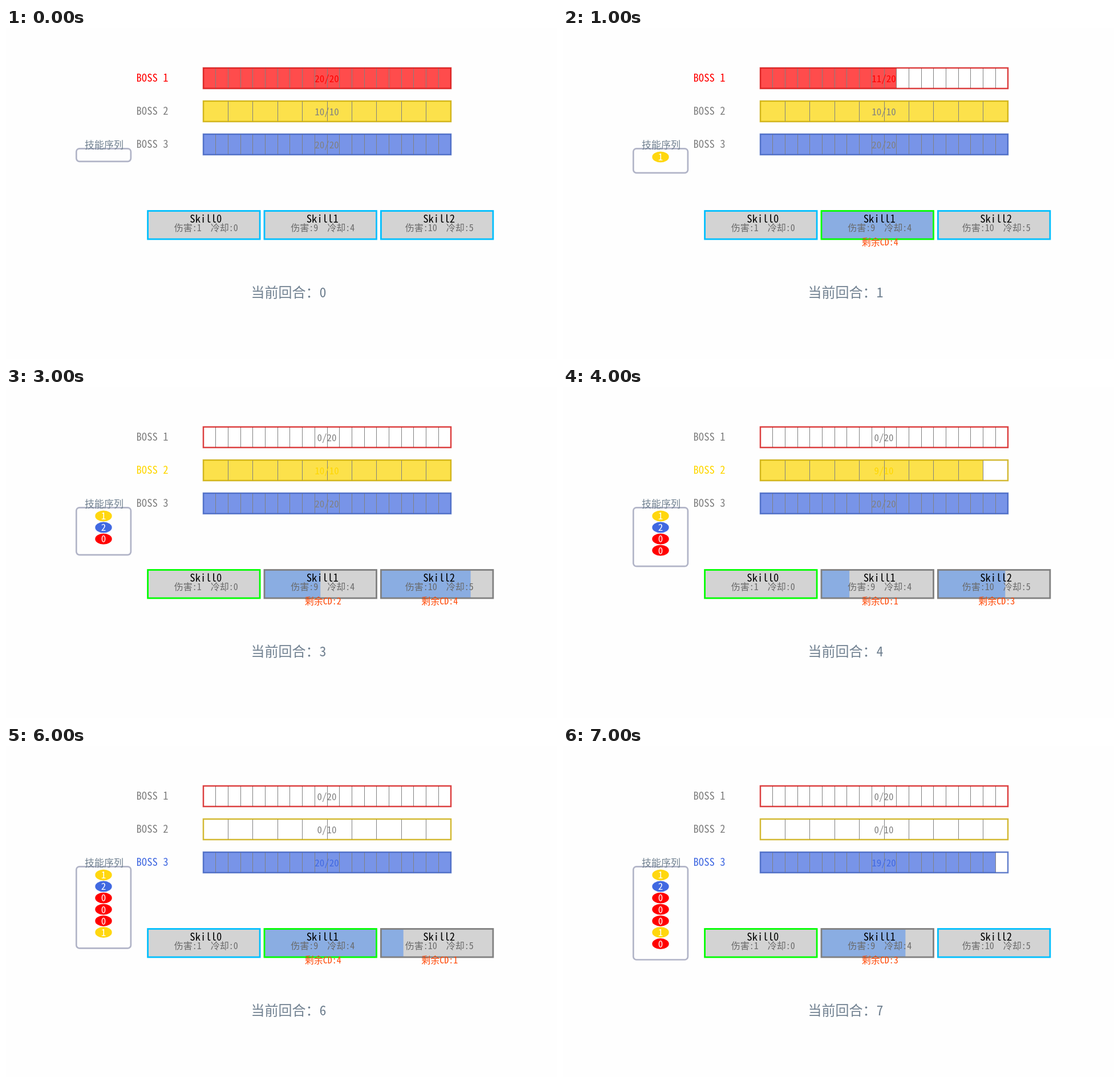
Animation, 966 px wide and 580 px high, one loop 8000 ms. Source, as an HTML page:

```html
<!DOCTYPE html>
<html lang="zh-CN">
<head>
<meta charset="utf-8">
<title>技能序列</title>
<style>
html, body { margin: 0; width: 100%; height: 100%; overflow: hidden; background: #fefefe; }
svg { display: block; }
text { font-family: "Noto Sans Mono CJK SC", "Noto Sans CJK SC", "Noto Sans CJK", "Noto Sans Mono", monospace; white-space: pre; }
</style>
</head>
<body>
<svg id="stage" width="966" height="580" viewBox="0 0 966 580"></svg>
<script>
const TURN_MS = 1000;
const TURNS = 8;
const CASTS = [1, 2, 0, 0, 0, 1, 0];
const BOSSES = [
  { hp: 20, color: '#ff0000', fill: '#ff4c4c', edge: '#d41010' },
  { hp: 10, color: '#ffd700', fill: '#fce14b', edge: '#c8a800' },
  { hp: 20, color: '#4169e1', fill: '#7894e8', edge: '#3c5fbe' }
];
const SKILLS = [
  { damage: 1, cooldown: 0, color: '#ff0000' },
  { damage: 9, cooldown: 4, color: '#ffd70f' },
  { damage: 10, cooldown: 5, color: '#4169e1' }
];
const BAR = { x: 346, y: 70, w: 434, h: 36, step: 58 };
const CARD = { x: 248.6, y: 320.5, w: 196.5, h: 49.5, step: 204.4 };
const GRAY = '#808080';
const SLATE = '#708090';
const stage = document.getElementById('stage');

function add(tag, attrs) {
  const el = document.createElementNS('http://www.w3.org/2000/svg', tag);
  stage.appendChild(el);
  return set(el, attrs);
}

function set(el, attrs) {
  for (const key in attrs) el.setAttribute(key, attrs[key]);
  return el;
}

function rect(x, y, width, height, attrs) {
  return add('rect', { x, y, width, height, ...attrs });
}

// Text whose visual middle lies at (x, y).
function label(text, x, y, size, fill, anchor = 'middle') {
  const el = add('text', { x, y: y + size * 0.37, 'font-size': size, fill, 'text-anchor': anchor });
  el.textContent = text;
  return el;
}

function buildBoss(boss, i) {
  const y = BAR.y + BAR.step * i;
  const mid = y + BAR.h / 2;
  const name = label('BOSS ' + (i + 1), 228.5, mid - 0.5, 18.67, GRAY, 'start');
  rect(BAR.x, y, BAR.w, BAR.h, { fill: '#fff' });
  const fill = rect(BAR.x, y, BAR.w, BAR.h, { fill: boss.fill });
  for (let k = 1; k < boss.hp; k++) {
    const x = Math.floor(BAR.x + BAR.w * k / boss.hp);
    rect(x, y, 1, BAR.h, { fill: GRAY });
  }
  rect(BAR.x, y, BAR.w, BAR.h, {
    fill: 'none', stroke: boss.edge, 'stroke-width': 2.5, 'stroke-opacity': 0.8
  });
  return { name, fill, count: label('', 562.5, mid + 0.3, 17, GRAY) };
}

function buildSkill(skill, i) {
  const x = CARD.x + CARD.step * i;
  const mid = x + CARD.w / 2 + 4;
  rect(x, CARD.y, CARD.w, CARD.h, { fill: '#d3d3d3' });
  const fill = rect(x, CARD.y, 0, CARD.h, { fill: '#8aade2' });
  const edge = rect(x, CARD.y, CARD.w, CARD.h, { fill: 'none', 'stroke-width': 2.8 });
  label('Skill' + i, mid - 0.5, 334, 18.67, '#000');
  label(`伤害:${skill.damage}  冷却:${skill.cooldown}`, mid, 350.5, 16, '#696969');
  return { fill, edge, left: label('', mid + 0.5, 375.5, 16, '#ff4500') };
}

const bars = BOSSES.map(buildBoss);
const queue = rect(123.3, 211.3, 95.6, 22.5, {
  rx: 5.5, fill: 'none', stroke: '#b1b4c7', 'stroke-width': 2.7
});
label('技能序列', 172, 205, 17, SLATE);
const chips = CASTS.map((id, i) => {
  const y = 226 + 20.1 * i;
  return [
    add('ellipse', { cx: 171, cy: y, rx: 14.7, ry: 9.5, fill: SKILLS[id].color }),
    label(id, 171, y, 17, '#fff')
  ];
});
const cards = SKILLS.map(buildSkill);
const turnText = label('', 429.5, 463.5, 24, SLATE, 'start');

// Replays the fight up to the given turn.
function stateAt(turn) {
  const hp = BOSSES.map(b => b.hp);
  const cd = SKILLS.map(() => 0);
  for (let i = 0; i < turn; i++) {
    const id = CASTS[i];
    const target = hp.findIndex(v => v > 0);
    hp[target] = Math.max(0, hp[target] - SKILLS[id].damage);
    cd.forEach((v, k) => { cd[k] = Math.max(0, v - 1); });
    cd[id] = SKILLS[id].cooldown;
  }
  return { hp, cd, active: hp.findIndex(v => v > 0), last: turn ? CASTS[turn - 1] : -1 };
}

function draw(turn) {
  const { hp, cd, active, last } = stateAt(turn);
  bars.forEach((bar, i) => {
    const boss = BOSSES[i];
    const fill = i === active ? boss.color : GRAY;
    set(bar.name, { fill });
    set(bar.count, { fill }).textContent = hp[i] + '/' + boss.hp;
    set(bar.fill, { width: BAR.w * hp[i] / boss.hp });
  });
  cards.forEach((card, i) => {
    const stroke = i === last ? '#00ff00' : cd[i] ? GRAY : '#00bfff';
    set(card.edge, { stroke });
    set(card.fill, { width: cd[i] ? CARD.w * cd[i] / SKILLS[i].cooldown : 0 });
    card.left.textContent = cd[i] ? '剩余CD:' + cd[i] : '';
  });
  set(queue, { height: 22.5 + 20.1 * turn });
  chips.forEach((chip, i) => chip.forEach(el =>
    set(el, { visibility: i < turn ? 'visible' : 'hidden' })));
  turnText.textContent = '当前回合：' + turn;
}

let start = null;
let shown = -1;
function tick(now) {
  if (start === null) start = now;
  const turn = Math.floor((now - start) / TURN_MS) % TURNS;
  if (turn !== shown) draw(shown = turn);
  requestAnimationFrame(tick);
}
draw(0);
requestAnimationFrame(tick);
</script>
</body>
</html>
```
